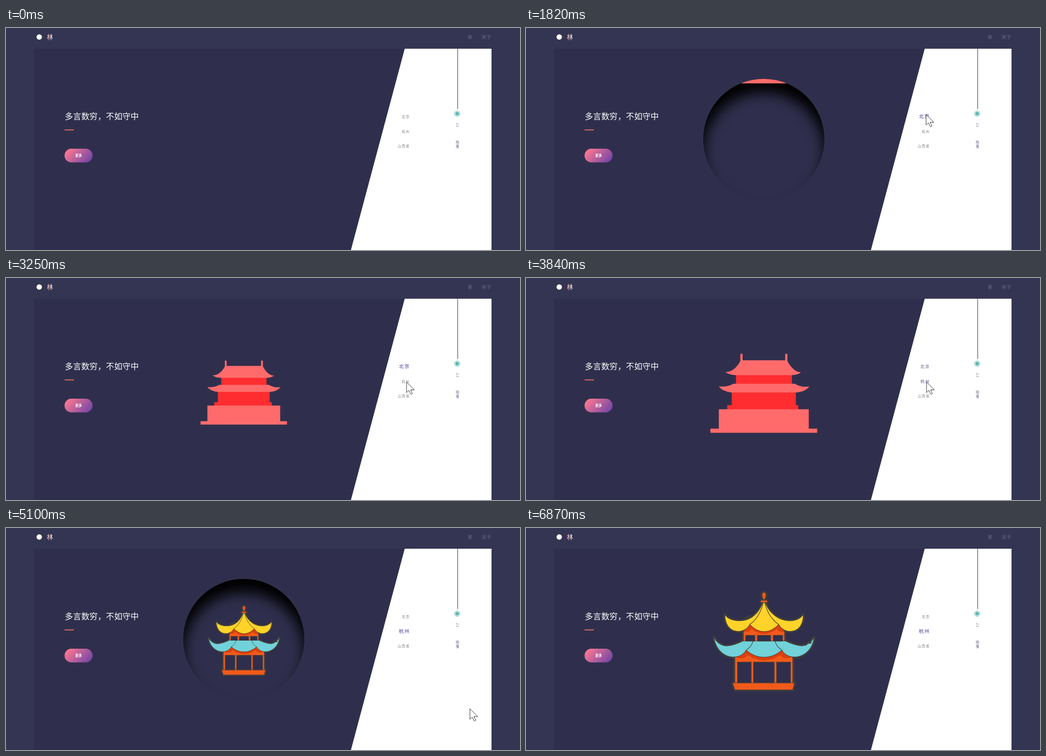
Animation of 1137 by 493 pixels, one loop 6900 ms. Source, as an HTML page:

```html
<!DOCTYPE html>
<html lang="zh-CN">
<head>
<meta charset="utf-8">
<title>多言数穷，不如守中</title>
<style>
  html, body { margin: 0; width: 100%; height: 100%; overflow: hidden; background: #343453; }
  svg { position: absolute; left: 0; top: 0; font-family: "Noto Sans CJK SC", "Noto Sans CJK", "Noto Sans", sans-serif; }
  #ring { position: absolute; left: 392px; top: 113px; width: 268px; height: 268px; border-radius: 50%; }
  .city { letter-spacing: 1.5px; text-anchor: end; }
  .side { font-size: 7.5px; fill: #5d4d7b; }
</style>
</head>
<body>
<svg width="1137" height="493">
  <defs>
    <linearGradient id="pill" gradientUnits="userSpaceOnUse" x1="138" y1="262" x2="184" y2="304">
      <stop offset="0.05" stop-color="#ff7891"/><stop offset="1" stop-color="#6a43a8"/>
    </linearGradient>
  </defs>
  <path fill="#2f2f4d" d="M62 46H1074V493H62Z"/>
  <path fill="#fff" d="M882 46H1074V493H763Z"/>

  <circle cx="73.500" cy="20" r="6" fill="#fff"/>
  <text x="90.500" y="24.800" font-size="13.300" fill="#fff">林</text>
  <path stroke="#d9705f" d="M94.500 14V25.500"/>
  <g font-size="10.700" fill="#6f6b7c">
    <text x="1021" y="24">家</text>
    <text x="1052" y="24">关于</text>
  </g>

  <text x="130" y="202.700" font-size="18.200" fill="#fff">多言数穷，不如守中</text>
  <path fill="#cb655d" d="M129.500 225H150V227.500H129.500Z"/>
  <rect x="129.500" y="268" width="62" height="30.500" rx="15.250" fill="url(#pill)"/>
  <text x="160.500" y="286" font-size="7.600" font-weight="700" fill="#fff" text-anchor="middle">更多</text>

  <path stroke="#68686c" stroke-width="1.500" d="M999.200 46V180"/>
  <circle cx="998" cy="190.200" r="6.300" fill="none" stroke="#66bcb7"/>
  <circle cx="998" cy="190.200" r="4.400" fill="#62b9b4"/>
  <text class="side" transform="translate(996 210.500) rotate(90)" letter-spacing="1.500">JJ</text>
  <text class="side" x="995" y="257">鸣</text>
  <text class="side" x="995" y="266">笺</text>

  <text class="city" id="north" x="893.500" y="200.200">北京</text>
  <text class="city" id="south" x="893.500" y="232.500">杭州</text>
  <text class="city" x="893.500" y="264.800" font-size="7.500" fill="#777a80">山西省</text>
</svg>

<div id="ring"></div>

<svg width="1137" height="493">
  <defs>
    <clipPath id="disc"><circle cx="526" cy="247" r="134"/></clipPath>
    <g id="pagoda" stroke-linejoin="round">
      <g fill="#f15a1b">
        <path d="M487 271L462 287V345H590V287L566 271Z"/>
        <path d="M457 344H594L590 359.500H462Z"/>
        <path d="M495 213L481 230V252H572V230L559 213Z"/>
      </g>
      <g fill="#d9400d" stroke-width="0">
        <path d="M487 271L464 287Q484 294 490 282Q527 306 563 282Q570 294 588 287L566 271Z"/>
        <path d="M495 213L482 230Q494 233 498 224Q527 246 555 224Q560 233 571 230L559 213Z"/>
      </g>
      <path fill="#72d2d9" d="M480 251H574C585 256 597 261 611 262C622 260 632 254 637 243C636 262 622 282 600 286C584 288 572 282 566 271Q548 287 526.500 287Q505 287 487 271C481 282 469 288 453 286C431 282 418 262 416 243C422 256 434 262 444 262C458 261 470 256 480 251Z"/>
      <path fill="#ffd329" d="M524 165C516 188 500 202 483 205C467 208 449 205 440 193C440 212 450 227 465 229C477 231 488 226 495 214Q510 230 527 230Q544 230 559 214C566 226 577 231 589 229C604 227 614 212 613 193C604 205 589 208 573 205C556 202 537 188 529 165Z"/>
      <g fill="#f15a1b">
        <path d="M526.500 161Q521 151 522.500 147A4 4 0 0 1 530.500 147Q532 151 526.500 161Z"/>
        <rect x="519" y="160.500" width="15" height="5" rx="2.500"/>
      </g>
    </g>
  </defs>

  <g id="gateClip"><g id="gate" fill="#ff6b6b">
    <path fill="#ff2d2f" d="M476.500 221H576V239H476.500ZM469 252H583V276H469ZM461 275.500H587.500V284H461Z"/>
    <path d="M484.300 184H488.300V197H484.300ZM564 184H568V197H564Z"/>
    <path d="M485 195.500H567.500C571 203 576 209 581 213Q586 216.500 592 217Q588 221.500 576 222H476Q464 221.500 457.500 216.500Q467 216 473 211Q481 204 485 195.500Z"/>
    <path d="M472 237.300H581Q594 245 607 242Q600 252 583 253H469Q452 251 446 242Q460 244 472 237.300Z"/>
    <path d="M446 283H606V317.500H621V325H431V317.500H446Z"/>
  </g></g>

  <g id="towerClip"><g id="tower">
    <use href="#pagoda" stroke="#403e3b" stroke-width="6"/>
    <use href="#pagoda" stroke="#3d3a38" stroke-width="1"/>
    <path fill="#2f2f4d" stroke="#3d3a38" stroke-width="1.500" d="M486 238.500H506V251H486ZM512 238.500H541V251H512ZM547 238.500H567.500V251H547ZM468 298H498V343.500H468ZM503.500 298H549V343.500H503.500ZM554.500 298H585V343.500H554.500Z"/>
    <path fill="none" stroke="#3d3a38" stroke-width="1.200" d="M525 166Q516 200 495 214M528 166Q537 200 559 214M502 251Q499 264 487 271M551 251Q554 264 566 271"/>
    <path fill="none" stroke="#403e3b" stroke-width="3.500" stroke-linecap="round" d="M483 202Q486 197 489 200Q492 194 497 196M612 260Q616 256 619 259Q623 253 630 255"/>
  </g></g>

  <path id="cursor" fill="#fff" stroke="#222" d="M0 0V23.500L5 18.700L9.500 27Q12 27 13 25.500L8.800 17.500H17.200Z"/>
</svg>

<script>
const LOOP = 6900, CX = 526, CY = 248, DROP = 218;
const $ = id => document.getElementById(id);
const clamp = x => Math.min(1, Math.max(0, x));
const mix = (a, b, k) => a + (b - a) * k;
const span = (t, from, to) => clamp((t - from) / (to - from));
const inOut = x => x < .5 ? 4 * x ** 3 : 1 - 4 * (1 - x) ** 3;
const out = x => 1 - (1 - x) ** 2;
const back = x => x <= 0 ? 0 : 1 + 4.8 * (x - 1) ** 3 + 3.8 * (x - 1) ** 2;

// time, x, y of the pointer tip
const path = [
  [180, 1042, 493], [520, 960, 330], [860, 897, 195], [950, 885, 192],
  [1850, 885, 192], [2150, 886, 231], [4830, 886, 231],
  [4920, 925, 277], [5100, 1026, 401], [5330, 1071, 493]
];

function pointer(t) {
  const i = path.findIndex(p => p[0] > t);
  $('cursor').style.display = i > 0 ? '' : 'none';
  if (i < 1) return;
  const [a, b] = [path[i - 1], path[i]], k = span(t, a[0], b[0]);
  $('cursor').setAttribute('transform', `translate(${mix(a[1], b[1], k)} ${mix(a[2], b[2], k)})`);
}

function city(id, k) {
  const rgb = [[119, 70], [122, 50], [128, 154]].map(c => Math.round(mix(...c, k)));
  $(id).setAttribute('font-size', mix(7.5, 10.6, k));
  $(id).setAttribute('font-weight', k > .5 ? 500 : 400);
  $(id).setAttribute('fill', `rgb(${rgb})`);
}

// Falls into the disc, then pops to full size; unit is the scale it is drawn at.
function building(id, t, unit, fall, free, pop, end) {
  const y = -DROP * (1 - inOut(span(t, fall, fall + 380)));
  const s = mix(1, 1.415, back(span(t, pop, pop + 480))) / unit;
  const clip = $(id + 'Clip');
  clip.style.display = t >= fall && t < end ? '' : 'none';
  clip.setAttribute('clip-path', t < free ? 'url(#disc)' : 'none');
  $(id).setAttribute('transform', `translate(${CX} ${CY + y}) scale(${s}) translate(${-CX} ${-CY})`);
}

function draw(t) {
  pointer(t);
  const swap = span(t, 3740, 3940);
  city('north', span(t, 900, 1100) * (1 - swap));
  city('south', swap);

  const ring = t < 3500
    ? inOut(span(t, 950, 1570)) * (1 - out(span(t, 2300, 2790)))
    : inOut(span(t, 4010, 4690)) * (1 - out(span(t, 5440, 5760)));
  $('ring').style.boxShadow = `inset 0 ${30 * ring}px ${30 * ring}px rgba(0,0,0,${ring})`;

  building('gate', t, 1.138, 1704, 2300, 3224, 4010);
  building('tower', t, 1.415, 4755, 5440, 6226, LOOP);
}

function tick() {
  draw(performance.now() % LOOP);
  requestAnimationFrame(tick);
}
tick();
</script>
</body>
</html>
```
